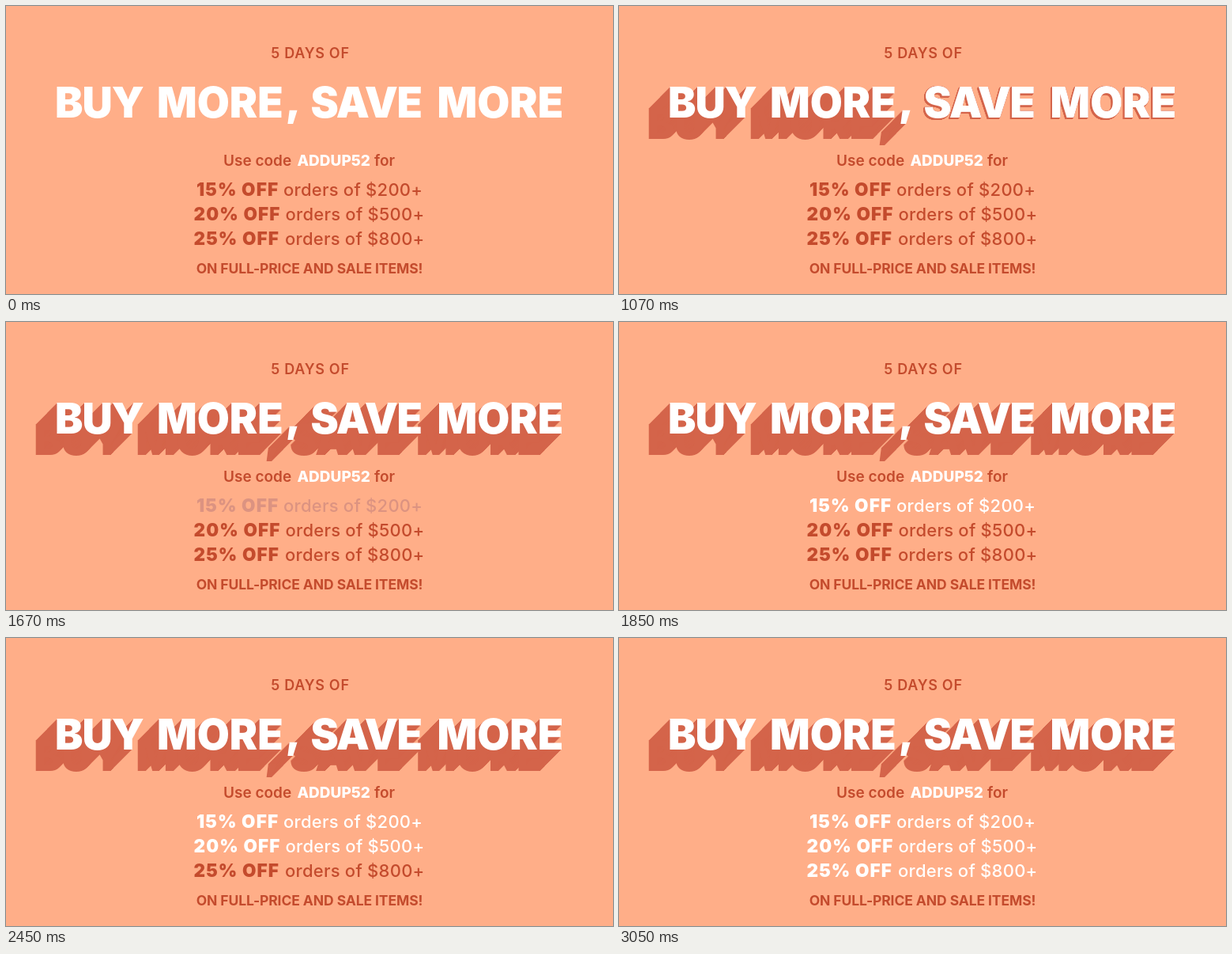
An HTML page for the animation above (4.2 s loop, 768 by 364 pixels).

```html
<!DOCTYPE html>
<html lang="en">
<head>
<meta charset="utf-8">
<title>Buy more, save more</title>
<style>
  html, body { margin: 0; width: 100%; height: 100%; overflow: hidden; background: #ffae88; }
  svg { display: block; width: 768px; height: 364px; }
  text { font-family: Inter, Roboto, Arial, sans-serif; font-optical-sizing: none; fill: #c44b2d; white-space: pre; }
  .title text { font-size: 53px; font-weight: 900; fill: inherit; }
  .intro { font-size: 18px; font-weight: 600; letter-spacing: .7px; }
  .code { font-size: 19px; font-weight: 600; }
  .key { font-weight: 800; fill: #fff; }
  .offer text { font-size: 22px; font-weight: 500; letter-spacing: .25px; fill: inherit; }
  .offer .deal { font-size: 22.5px; font-weight: 900; letter-spacing: 1.1px; }
  .note { font-size: 17.5px; font-weight: 700; letter-spacing: -.1px; }
</style>
</head>
<body>
<svg id="stage" viewBox="0 0 768 364"></svg>
<script>
const LOOP = 4200, STEP = 30;
const RED = [196, 75, 45], WHITE = [255, 255, 255];
const LAYERS = 27;
const stage = document.getElementById('stage');

function add(parent, tag, attrs = {}, content = '') {
  const el = document.createElementNS('http://www.w3.org/2000/svg', tag);
  for (const name in attrs) el.setAttribute(name, attrs[name]);
  el.textContent = content;
  parent.append(el);
  return el;
}

function drawWords(parent, words) {
  for (const [x, word, spacing = 0, y = 141] of words)
    add(parent, 'text', { x, y, 'letter-spacing': spacing }, word);
}

const halves = [
  { start: 500, words: [[62, 'BUY', -1], [191, 'MORE', 0], [353.5, ',', 0, 138]] },
  { start: 1070, words: [[385.5, 'SAVE', -1.5], [545.5, 'MORE', 0]] }
];
const offers = [
  { start: 1580, y: 240, x: 241, deal: '15% OFF', restX: 351, rest: 'orders of $200+' },
  { start: 2180, y: 271, x: 237.5, deal: '20% OFF', restX: 353.5, rest: 'orders of $500+' },
  { start: 2780, y: 302, x: 237.5, deal: '25% OFF', restX: 353, rest: 'orders of $800+' }
];

for (const half of halves) {
  half.shadow = add(stage, 'g', { class: 'title', fill: '#d4644a' });
  half.layers = Array.from({ length: LAYERS }, () => {
    const layer = add(half.shadow, 'g');
    drawWords(layer, half.words);
    return layer;
  });
}
const front = add(stage, 'g', { class: 'title', fill: '#fff' });
for (const half of halves) drawWords(front, half.words);

add(stage, 'text', { class: 'intro', x: 385, y: 65.5, 'text-anchor': 'middle' }, '5 DAYS OF');
add(stage, 'text', { class: 'code', x: 275, y: 202 }, 'Use code');
add(stage, 'text', { class: 'code key', x: 368.5, y: 202 }, 'ADDUP52');
add(stage, 'text', { class: 'code', x: 466, y: 202 }, 'for');
for (const offer of offers) {
  offer.group = add(stage, 'g', { class: 'offer' });
  add(offer.group, 'text', { class: 'deal', x: offer.x, y: offer.y }, offer.deal);
  add(offer.group, 'text', { x: offer.restX, y: offer.y }, offer.rest);
}
add(stage, 'text', { class: 'note', x: 384, y: 338, 'text-anchor': 'middle' },
  'ON FULL-PRICE AND SALE ITEMS!');

const stepAt = (time, start, count) =>
  Math.max(0, Math.min(count, Math.floor((time - start) / STEP) + 1));

// Shadow length: starts slowly, then gains speed up to its full depth.
const reach = n => .8 + 1.17 * n + .108 * n * n;

function render(time) {
  for (const { start, shadow, layers } of halves) {
    const step = stepAt(time, start, 11);
    shadow.setAttribute('visibility', step ? 'visible' : 'hidden');
    layers.forEach((layer, i) => {
      const d = reach(step) * (i + 1) / LAYERS;
      layer.setAttribute('transform', `translate(${-d} ${d})`);
    });
  }
  for (const { start, group } of offers) {
    const mix = stepAt(time, start, 10) / 10;
    const color = RED.map((c, i) => Math.round(c + (WHITE[i] - c) * mix));
    group.setAttribute('fill', `rgb(${color})`);
  }
}

const begin = performance.now();
function tick() {
  render((performance.now() - begin) % LOOP);
  requestAnimationFrame(tick);
}
render(0);
requestAnimationFrame(tick);
</script>
</body>
</html>
```
